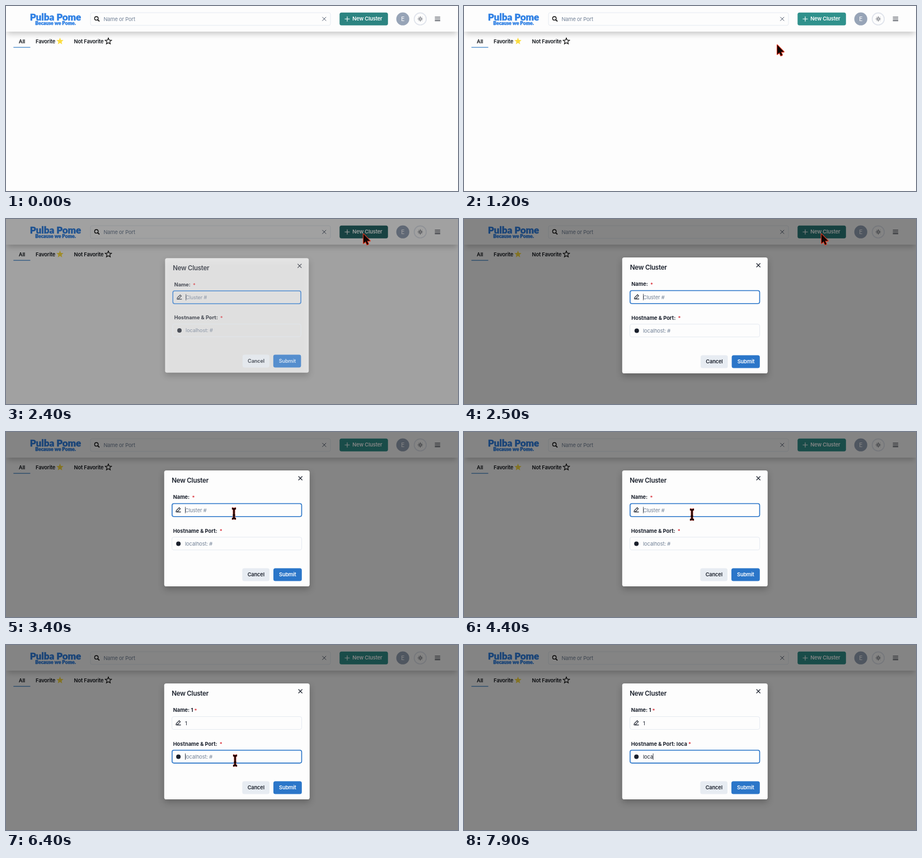
These frames come from a looping animation (808x332 px, 8000 ms). An HTML page with a canvas:

```html
<!DOCTYPE html>
<html lang="en">
<head>
<meta charset="utf-8">
<title>New Cluster</title>
<style>
  html, body { margin: 0; width: 100%; height: 100%; overflow: hidden; background: #fdfdfd; }
  canvas { display: block; width: 808px; height: 332px; }
</style>
</head>
<body>
<canvas id="stage"></canvas>
<script>
const W = 808, H = 332, LOOP = 8000, STEP = 100;
const canvas = document.getElementById('stage');
const ctx = canvas.getContext('2d');
const dpr = window.devicePixelRatio || 1;
canvas.width = W * dpr;
canvas.height = H * dpr;

const INK = '#1a202c', MUTED = '#718096', BLUE = '#2b76c9', LINE = '#e2e8f0';
const SANS = 'Inter, "Open Sans", sans-serif';
const SIZE = 9.28;

// Timed keys: [ms, value, ...]
const hoverKeys = [[0, .25], [200, 0], [1500, 0], [1700, 1], [2300, 1], [2400, .8], [2600, 0]];
const dialogKeys = [[2300, 0], [2400, .76], [2500, 1]];
const swapKeys = [[6200, 0], [6400, 1]];
const pointerKeys = [
  [600, 186, 204], [700, 190, 184], [800, 194, 156], [900, 212, 143], [1000, 330, 108],
  [1100, 475, 80], [1200, 560, 70], [1300, 628, 56], [1400, 651, 60], [1500, 646, 50],
  [1600, 641, 33], [1900, 639, 27], [2500, 639, 27], [2600, 634, 38], [2800, 590, 125],
  [3000, 520, 220], [3100, 505, 236], [3200, 458, 188], [3300, 416, 150], [3400, 407.5, 146.5],
  [5400, 407.5, 150], [5500, 407.5, 160], [5700, 411, 192], [5900, 409.5, 207.5]
];

function at(keys, t) {
  if (t <= keys[0][0]) return keys[0].slice(1);
  for (let i = 1; i < keys.length; i++) {
    const a = keys[i - 1], b = keys[i];
    if (t <= b[0]) {
      const k = (t - a[0]) / (b[0] - a[0]);
      return a.slice(1).map((v, j) => v + (b[j + 1] - v) * k);
    }
  }
  return keys[keys.length - 1].slice(1);
}

function mix(a, b, k) {
  return `rgb(${a.map((v, i) => Math.round(v + (b[i] - v) * k)).join(',')})`;
}

function setFont(weight, size, track = -.015, family = SANS) {
  ctx.font = `${weight} ${size}px ${family}`;
  ctx.letterSpacing = `${track * size}px`;
}

// y is the middle of the capitals
function text(str, x, y, color, weight = 400, size = SIZE, track, align = 'left') {
  setFont(weight, size, track);
  ctx.fillStyle = color;
  ctx.textAlign = align;
  ctx.fillText(str, x, y + size * .364);
  return ctx.measureText(str).width;
}

function box(x, y, w, h, r, fill, stroke, lw = 1) {
  ctx.beginPath();
  ctx.roundRect(x, y, w, h, r);
  if (fill) { ctx.fillStyle = fill; ctx.fill(); }
  if (stroke) { ctx.strokeStyle = stroke; ctx.lineWidth = lw; ctx.stroke(); }
}

function disc(x, y, r, fill) {
  ctx.beginPath();
  ctx.arc(x, y, r, 0, 7);
  ctx.fillStyle = fill;
  ctx.fill();
}

function lines(color, lw, ...segs) {
  ctx.beginPath();
  for (const [x1, y1, x2, y2] of segs) { ctx.moveTo(x1, y1); ctx.lineTo(x2, y2); }
  ctx.strokeStyle = color;
  ctx.lineWidth = lw;
  ctx.stroke();
}

function cross(x, y, r, color, lw) {
  lines(color, lw, [x - r, y - r, x + r, y + r], [x + r, y - r, x - r, y + r]);
}

function star(x, y, r) {
  ctx.beginPath();
  for (let i = 0; i < 10; i++) {
    const a = -Math.PI / 2 + i * Math.PI / 5, d = i % 2 ? r * .45 : r;
    ctx.lineTo(x + d * Math.cos(a), y + d * Math.sin(a));
  }
  ctx.closePath();
}

function brand(str, y, size) {
  setFont(900, size, 0, 'Lato, "Open Sans", sans-serif');
  ctx.textAlign = 'center';
  ctx.fillStyle = ctx.strokeStyle = '#2f80e4';
  ctx.lineWidth = .4;
  ctx.fillText(str, 88.5, y);
  ctx.strokeText(str, 88.5, y);
}

function header(t) {
  ctx.save();
  ctx.shadowColor = 'rgba(0,0,0,.22)';
  ctx.shadowBlur = 10 * dpr;
  ctx.shadowOffsetY = 5 * dpr;
  ctx.fillStyle = '#fdfdfd';
  ctx.fillRect(2, 0, W - 4, 45);
  ctx.restore();
  ctx.fillStyle = '#fdfdfd';
  ctx.fillRect(0, 0, W, 46);

  brand('Pulba Pome', 25.5, 17);
  brand('Because we Pome.', 34, 8.65);

  box(151, 12, 429, 22.8, 3, null, LINE, .9);
  ctx.beginPath();
  ctx.arc(161.6, 22.2, 3.2, 0, 7);
  ctx.strokeStyle = '#111';
  ctx.lineWidth = 1.4;
  ctx.stroke();
  lines('#111', 1.7, [164, 24.6, 167, 27.6]);
  text('Name or Port', 174.5, 23.3, MUTED);
  cross(568.8, 23.2, 3.4, '#4a5568', 1);

  const [hover] = at(hoverKeys, t);
  box(596.3, 11.7, 86.5, 23.1, 3.5, mix([47, 145, 140], [35, 94, 94], hover));
  lines('#fff', 1.1, [605.5, 23.2, 614.5, 23.2], [610, 18.7, 610, 27.7]);
  text('New Cluster', 619.3, 23, '#fff', 600);

  disc(709.3, 23.2, 11.6, '#97a4b7');
  text('E', 709.5, 23.3, '#fff', 400, 10.6, 0, 'center');

  ctx.beginPath();
  ctx.arc(740.5, 23.2, 10.8, 0, 7);
  ctx.strokeStyle = '#dfe3eb';
  ctx.lineWidth = 1.6;
  ctx.stroke();
  ctx.beginPath();
  ctx.arc(740.5, 23.2, 2, 0, 7);
  ctx.strokeStyle = INK;
  ctx.lineWidth = .9;
  ctx.stroke();
  const rays = [...Array(8).keys()].map(i => {
    const c = Math.cos(i * Math.PI / 4), s = Math.sin(i * Math.PI / 4);
    return [740.5 + 3.2 * c, 23.2 + 3.2 * s, 740.5 + 4.5 * c, 23.2 + 4.5 * s];
  });
  lines(INK, .9, ...rays);
  lines(INK, 1.1, ...[20, 23.2, 26.4].map(y => [766.6, y, 776.2, y]));
}

function tabs() {
  text('All', 28.5, 63.4, '#0d1117', 600, SIZE, -.01, 'center');
  text('Favorite', 53, 63.4, '#0d1117', 600);
  text('Not Favorite', 121.6, 63.4, '#0d1117', 600);
  lines('#3a82c8', 1.2, [13.3, 74.2, 43.4, 74.2]);
  star(96.5, 63.3, 6.6);
  ctx.fillStyle = '#fbdc3f';
  ctx.fill();
  star(183, 63.3, 5.9);
  ctx.strokeStyle = '#111';
  ctx.lineWidth = 1.2;
  ctx.stroke();
}

function pencil(x, y) {
  ctx.beginPath();
  ctx.moveTo(x - 4, y + 3.6);
  ctx.lineTo(x - 3.6, y + 1.2);
  ctx.lineTo(x + 1.6, y - 4);
  ctx.lineTo(x + 3.6, y - 2);
  ctx.lineTo(x - 1.6, y + 3.2);
  ctx.closePath();
  ctx.strokeStyle = INK;
  ctx.lineWidth = 1.1;
  ctx.stroke();
  lines(INK, 1.3, [x - 3.2, y + 3.7, x + 4.6, y + 3.7]);
}

function label(name, value, y) {
  const w = text(name + ' ' + value, 298.7, y, INK, 700, SIZE, 0);
  text('*', 298.7 + w + 2, y + .6, '#d9303a', 600, SIZE, 0);
}

// focus runs 0..1; caret is shown when true
function field(y, value, hint, focus, caret) {
  box(296.6, y - 11.5, 232, 23, 3.3, null, LINE, .9);
  if (focus > 0) {
    ctx.save();
    ctx.globalAlpha *= focus;
    box(296.9, y - 11.5, 231.6, 23.2, 3.3, null, BLUE, 1.6);
    ctx.restore();
  }
  text(value || hint, 320, y + .2, value ? INK : MUTED);
  const w = value ? ctx.measureText(value).width + .3 : .6;
  if (caret) lines(INK, .8, [320 + w, y - 5.6, 320 + w, y + 5.8]);
}

function blink(t, since) {
  return Math.floor((t - since) / 500) % 2 === 0;
}

function dialog(t) {
  const [show] = at(dialogKeys, t);
  if (!show) return;
  ctx.fillStyle = `rgba(0,0,0,${.48 * show})`;
  ctx.fillRect(0, 0, W, H);

  ctx.save();
  ctx.globalAlpha = show;
  const scale = .95 + .05 * show;
  ctx.translate(413, 173);
  ctx.scale(scale, scale);
  ctx.translate(-413, -173);

  ctx.save();
  ctx.shadowColor = 'rgba(0,0,0,.25)';
  ctx.shadowBlur = 12 * dpr;
  ctx.shadowOffsetY = 5 * dpr;
  box(282.8, 69, 260, 208, 3.6, '#fdfdfd');
  ctx.restore();

  const name = t >= 4800 ? '1' : '';
  const host = t >= 7600 ? 'loca'.slice(0, (t - 7500) / STEP) : '';
  const second = t >= 6300;
  const [swap] = at(swapKeys, t);
  const shift = t < 3200 ? .6 : 0;

  cross(526.2, 83, 3.5, INK, 1.1);
  ctx.translate(shift, 0);
  text('New Cluster', 296.2, 87.2, INK, 600, 11.6, -.022);
  label('Name:', name, 117);
  label('Hostname & Port:', host, 177.2);
  pencil(308, 139.8);
  disc(308.2, 200.4, 4, INK);
  ctx.translate(-shift, 0);

  field(140, name, 'Cluster #', 1 - swap, !second && blink(t, name ? 4900 : 2400));
  field(200.2, host, 'localhost: #', swap, second && blink(t, host ? 7600 : 6300));

  ctx.translate(shift, 0);
  box(422.4, 244.4, 48.6, 23.2, 3.5, '#e7ecf2');
  text('Cancel', 446.8, 255.8, INK, 600, SIZE, -.015, 'center');
  box(478, 244.4, 50.8 - shift, 23.2, 3.5, BLUE);
  text('Submit', 503.4, 255.8, '#fff', 600, SIZE, -.015, 'center');
  ctx.restore();
}

const arrowShape = new Path2D('M0 0V16.8L3.9 13.3L6.4 19.2L9 18L6.5 12.3H11.8Z');
const handShape = new Path2D('M-1.8 1.5Q-1.8 0 0 0Q1.6 0 1.8 1.5L2.3 6Q4 5 5 6.4Q7 5.6 7.8 7.2' +
  'Q10 6.8 10.4 9L11 13Q11 16 9.5 19H1.5Q0 16 -4 11.5Q-4.8 9.4 -3 9.4Q-1.6 9.6 -.6 11Z');
const handFolds = new Path2D('M3 12.5V16M5.3 12.5V16M7.6 12.5V16');
const beamShape = new Path2D('M-3.6 -9.2Q-.4 -9.2 0 -7Q.4 -9.2 3.6 -9.2M0 -7V7' +
  'M-3.6 9.2Q-.4 9.2 0 7Q.4 9.2 3.6 9.2M-2 2.6H2');

function strokeShape(shape, color, lw) {
  ctx.strokeStyle = color;
  ctx.lineWidth = lw;
  ctx.stroke(shape);
}

function pointer(t) {
  if (t < 600 || (t >= 4800 && t < 5400) || t >= 7600) return;
  const [x, y] = at(pointerKeys, t);
  const inField = t > 2500 && x > 297 && x < 529 &&
    (Math.abs(y - 140) < 12 || Math.abs(y - 200) < 12);
  ctx.save();
  ctx.lineJoin = 'round';
  ctx.translate(x, y);
  if (inField) {
    strokeShape(beamShape, '#a3261c', 4);
    strokeShape(beamShape, '#120504', 2.2);
  } else {
    const hand = t >= 1600 && t < 2400;
    const shape = hand ? handShape : arrowShape;
    if (hand) ctx.translate(6, 2.4);
    strokeShape(shape, '#e23c24', 2.2);
    ctx.fillStyle = '#120504';
    ctx.fill(shape);
    if (hand) strokeShape(handFolds, '#c5301f', .8);
  }
  ctx.restore();
}

function draw(t) {
  ctx.setTransform(dpr, 0, 0, dpr, 0, 0);
  ctx.fillStyle = '#fdfdfd';
  ctx.fillRect(0, 0, W, H);
  header(t);
  tabs();
  dialog(t);
  pointer(t);
}

const start = performance.now();
function tick() {
  const t = (performance.now() - start) % LOOP;
  draw(Math.floor(t / STEP) * STEP);
  requestAnimationFrame(tick);
}
tick();
</script>
</body>
</html>
```
